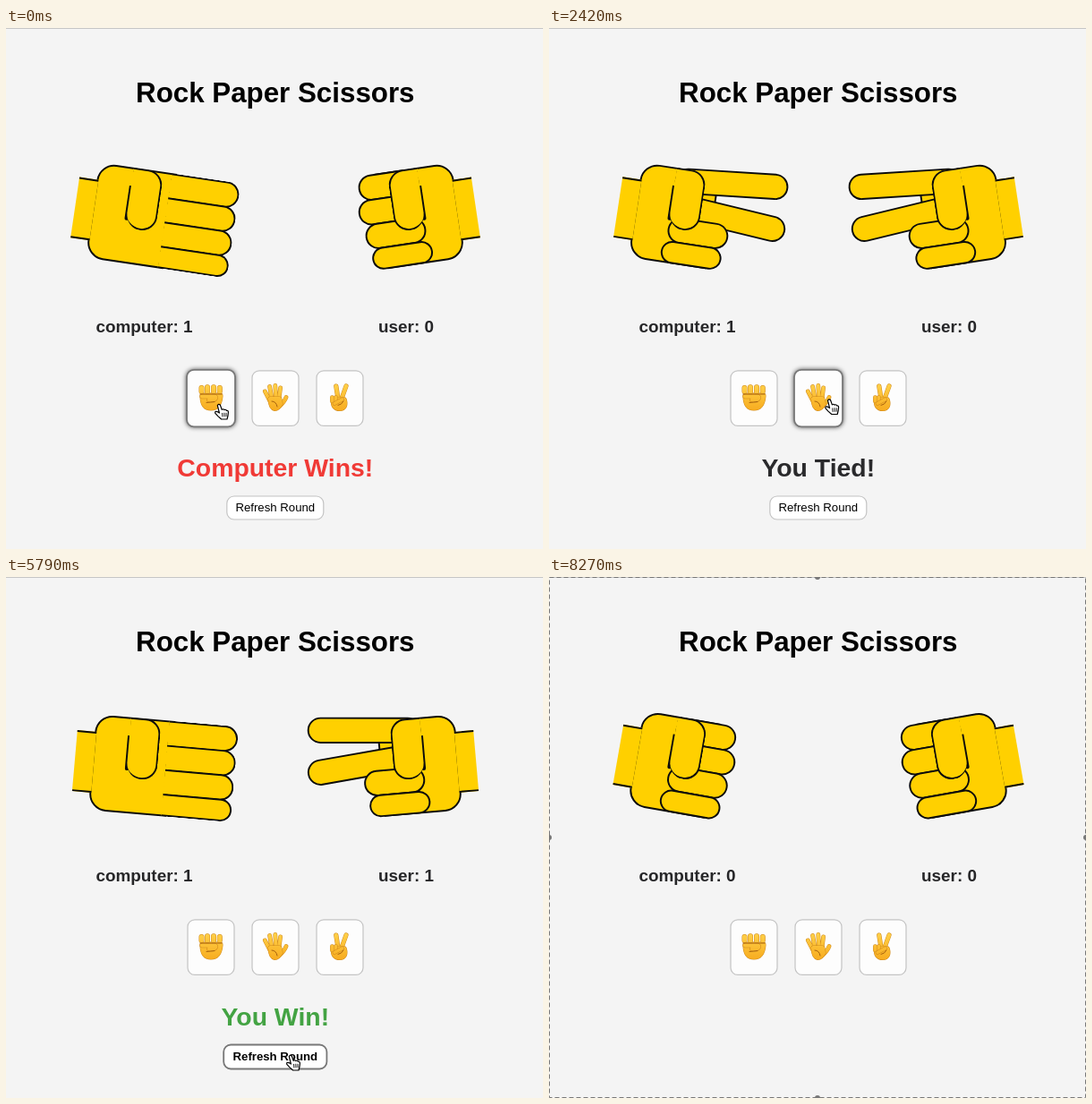
Write an HTML page that moves like this. It is 600 px wide and 582 px high and loops after 8300 ms.

```html
<!DOCTYPE html>
<html lang="en">
<head>
<meta charset="utf-8">
<title>Rock Paper Scissors</title>
<style>
html, body { margin: 0; width: 100%; height: 100%; overflow: hidden; background: #f4f4f4; }
svg { position: absolute; left: 0; top: 0; }
text { font-family: "Liberation Sans", Arial, sans-serif; font-weight: bold; text-anchor: middle; fill: #262628; }
.hand { position: absolute; top: 106.5px; width: 200px; height: 200px; }
.hand div { position: absolute; box-sizing: border-box; border: 2px solid #0b0b0b; background: #ffd000; }
.hand .fist { left: 40px; top: 50px; width: 90px; height: 110px; border-radius: 20px 0 0 20px; }
.hand .finger { height: 30px; transform-origin: 0 50%; }
.hand .thumb { left: 80px; top: 50px; width: 35px; height: 70px; border-left: 0 solid;
  border-radius: 0 20px 20px 20px; box-shadow: -17px 6px 0 -15px #0b0b0b; }
.hand .arm { left: 20px; top: 70px; width: 22px; height: 70px; border-width: 2px 0; }
.emoji { stroke-linecap: round; stroke-linejoin: round; fill: none; }
</style>
</head>
<body>
<svg width="600" height="582">
  <defs>
    <linearGradient id="skin" gradientUnits="userSpaceOnUse" x1="0" y1="397" x2="0" y2="428">
      <stop offset="0" stop-color="#ffd24a"/><stop offset="1" stop-color="#f7ab1f"/>
    </linearGradient>
  </defs>
  <path d="M0 .5H600" stroke="#c6c6c6"/>
  <text x="300.8" y="83" font-size="31.3" style="fill:#000">Rock Paper Scissors</text>
  <text id="compScore" x="154.5" y="340" font-size="18.9"></text>
  <text id="userScore" x="447" y="340" font-size="18.9"></text>
  <g id="buttons"></g>
  <g class="emoji" id="emoji"></g>
  <text id="result" x="300.8" y="500.5" font-size="28.4"></text>
  <g id="refresh">
    <rect fill="#fff"/>
    <text x="300.8" y="540" font-size="13.2" style="fill:#000">Refresh Round</text>
  </g>
  <g id="frame" fill="#777">
    <rect x=".5" y=".5" width="599" height="581" fill="none" stroke="#777" stroke-dasharray="5 3"/>
    <circle cx="300" r="3"/><circle cy="291" r="3"/>
    <circle cx="600" cy="291" r="3"/><circle cx="300" cy="582" r="3"/>
  </g>
  <g id="cursor">
    <g id="pointer" stroke="#000" stroke-linejoin="round" stroke-linecap="round">
      <path fill="#fff" stroke-width="1.2" d="M-1.7 1.6Q-.4-.7 1.3 1L3.2 6.4Q4.6 5 5.9 6.6Q7.4 5.6 8.4 7.4Q10.4 7 10.4 9.4L10 13L9 17H2.6L-1.2 13.6L-4.2 10.4Q-4.9 7.6-2 8.6L.4 10Z"/>
      <path fill="none" stroke-width=".9" d="M3.6 10.4l.3 3.6M5.8 10.2l.2 3.7M8 10.2v3.6"/>
    </g>
    <path id="arrow" fill="#000" stroke="#fff" d="M0 0V13.5L3 10.8L5.2 15.8L7.5 14.8L5.3 10H9.4Z"/>
  </g>
</svg>
<script>
const LOOP = 8300;
const $ = id => document.getElementById(id);
const mix = (a, b, p) => a + (b - a) * p;
const clamp = x => Math.min(1, Math.max(0, x));
const smooth = x => x * x * (3 - 2 * x);

// CSS "ease" curve, solved by bisection
function ease(x) {
  const bez = (a, b, s) => 3 * a * s * (1 - s) ** 2 + 3 * b * s * s * (1 - s) + s ** 3;
  let lo = 0, hi = 1;
  for (let i = 0; i < 24; i++) {
    const mid = (lo + hi) / 2;
    if (bez(.25, .25, mid) < x) lo = mid; else hi = mid;
  }
  return bez(.1, 1, lo);
}

// Finger poses: [left, width, rotation, left border, left radius]
const lefts = [80, 84, 80, 76];
const rock = lefts.map(l => [l, 70, 0, 2, 20]);
const paper = lefts.map(() => [124, 80, 0, 0, 0]);
const scissors = rock.map((f, i) => i < 2 ? [f[0], 130, i ? 5 : -5, 2, 20] : f);

const RED = "#f03a36", GREEN = "#43a343", DARK = "#2a2a2c";
// [time, computer pose, user pose, computer score, user score, result, colour]
const rounds = [
  [0, paper, rock, 1, 0, "Computer Wins!", RED],
  [800, paper, paper, 1, 0, "You Tied!", DARK],
  [1900, scissors, scissors, 1, 0, "You Tied!", DARK],
  [2950, paper, paper, 1, 0, "You Tied!", DARK],
  [4300, paper, scissors, 1, 1, "You Win!", GREEN],
  [6080, rock, rock, 0, 0, "", DARK]
];

// Cursor stops: [time, x, y]
const stops = [
  [0, 238, 420], [120, 240, 420], [560, 299, 419], [900, 301, 419], [1380, 352, 417],
  [1560, 353, 417], [1800, 370, 417], [2020, 369, 417], [2340, 314, 414.5], [2450, 313, 414.5],
  [2750, 301, 416], [3500, 302, 416], [3960, 362, 416], [4450, 368, 419],
  [5550, 318, 534], [6150, 318, 534], [6650, 560, 540]
];

const buttonXs = [229, 301, 373];
const boxes = buttonXs.map(x => [x, 413.6, 26, 30.8]).concat([[300.8, 536, 54, 13]]);

function cursorAt(t) {
  let i = 0;
  while (i < stops.length - 2 && t >= stops[i + 1][0]) i++;
  const a = stops[i], b = stops[i + 1];
  const p = smooth(clamp((t - a[0]) / (b[0] - a[0])));
  return [mix(a[1], b[1], p), mix(a[2], b[2], p)];
}

function over(box, t) {
  const [x, y] = cursorAt(Math.max(0, t));
  return Math.abs(x - box[0]) < box[2] && Math.abs(y - box[1]) < box[3];
}

// Hover strength trails the cursor a little
const hover = (box, t) => [60, 80, 100, 120, 140].filter(d => over(box, t - d)).length / 5;

function styleBox(rect, [x, y, w, h], growX, growY, a) {
  const g = mix(196, 120, a);
  const attrs = {
    x: x - w - growX, y: y - h - growY, width: 2 * (w + growX), height: 2 * (h + growY), rx: 8,
    stroke: `rgb(${g},${g},${g})`, "stroke-width": mix(1.2, 1.8, a)
  };
  for (const k in attrs) rect.setAttribute(k, attrs[k]);
}

function makeHand(cx, flip) {
  const hand = document.createElement("div");
  hand.className = "hand";
  hand.style.left = cx - 100 + "px";
  hand.innerHTML = '<div class="fist"></div>' + '<div class="finger"></div>'.repeat(4) +
    '<div class="thumb"></div><div class="arm"></div>';
  document.body.append(hand);
  const fingers = [...hand.querySelectorAll(".finger")];
  fingers.forEach((f, i) => f.style.top = 50 + 28 * i + "px");
  fingers[3].style.height = "26px";
  return (angle, from, to, p) => {
    hand.style.transform = `scale(${flip * .975}, .975) rotate(${angle}deg)`;
    fingers.forEach((f, i) => {
      const [l, w, r, b, rad] = to[i].map((v, k) => mix(from[i][k], v, p));
      f.style.left = l + "px";
      f.style.width = w + "px";
      f.style.transform = `rotate(${r}deg)`;
      f.style.borderLeftWidth = b + "px";
      f.style.borderRadius = `${rad}px 20px 20px ${rad}px`;
    });
  };
}

// Small emoji: limbs are thick strokes with a darker rim
function limbs(width, ...paths) {
  const d = paths.join("");
  return `<path d="${d}" stroke="#d08a1c" stroke-width="${width + 1}"/>` +
    `<path d="${d}" stroke="url(#skin)" stroke-width="${width}"/>`;
}
const body = d => `<path d="${d}" fill="url(#skin)"/>`;
const crease = d => `<path d="${d}" stroke="#a8620f" stroke-width="1"/>`;

$("emoji").innerHTML =
  // fist
  limbs(6, "M220 411Q220 424 229 424Q238 424 239 411Z") + body("M219 409H240L238 422Q229 428 221 422Z") +
  limbs(5, "M218.5 402V406", "M225 401.3V406") + limbs(5, "M232 401.3V406", "M238.8 402V406") +
  limbs(4.4, "M219 411.5H233Q236 413 232 415.5H227") + crease("M217 409H241M224 418.5Q229 418 233 417.5") +
  // open palm
  limbs(3.8, "M295 417L289.4 406", "M297 414L294.6 400.5", "M301.5 413L300.8 399.5", "M305 414L306.6 402", "M305 423Q311 418 313 412.5") +
  limbs(5, "M295.5 414.5H305.5L306.5 420Q304 425 300.5 425Q296 424 295.5 414.5") +
  body("M294 413H307L307 421Q304 426 300 426Q295 424 294 413Z") + crease("M297 417Q302 417 303 423") +
  // victory
  limbs(4.2, "M371 414L368.8 400", "M375 414L380 400") +
  limbs(7, "M367 416H377Q379 424 373 424Q366 424 367 416Z") + body("M365 415H379L378 423Q372 427 367 423Z") +
  limbs(3.6, "M364.4 412.5V417", "M368.5 412.5V417") + limbs(3.6, "M367 419.5L375.5 415") + crease("M371 421.5Q375 421 377 417");

$("buttons").innerHTML = '<rect fill="#fdfdfd"/>'.repeat(3);
const buttonRects = [...$("buttons").children];
const [refreshRect, refreshText] = $("refresh").children;
const computerHand = makeHand(155, 1), userHand = makeHand(446.7, -1);

function draw(t) {
  let i = rounds.length - 1;
  while (t < rounds[i][0]) i--;
  const now = rounds[i], before = rounds[Math.max(0, i - 1)];
  const change = i ? ease(clamp((t - now[0]) / 100)) : 1;

  // Two-second shake between 10 and -10 degrees
  const phase = (t + 1660) % 2000;
  const swing = 10 - 20 * ease(phase % 1000 / 1000);
  const angle = phase < 1000 ? swing : -swing;
  computerHand(angle, before[1], now[1], change);
  userHand(angle, before[2], now[2], change);

  $("compScore").textContent = "computer: " + now[3];
  $("userScore").textContent = "user: " + now[4];
  $("result").textContent = now[5];
  $("result").style.fill = now[6];

  buttonRects.forEach((rect, k) => {
    const a = hover(boxes[k], t);
    styleBox(rect, boxes[k], a, a, a);
    rect.style.filter = a ? `drop-shadow(0 0 ${2.5 * a}px #555)` : "none";
  });

  $("refresh").style.display = now[5] ? "" : "none";
  const a = hover(boxes[3], t);
  styleBox(refreshRect, boxes[3], 3.6 * a, .5 * a, a);
  refreshText.style.fontWeight = a > .5 ? "bold" : "normal";

  const [x, y] = cursorAt(t);
  const pointing = boxes.some((b, k) => (k < 3 || now[5]) && over(b, t));
  $("cursor").style.display = t < 6780 ? "" : "none";
  $("cursor").setAttribute("transform", `translate(${x} ${y})`);
  $("pointer").style.display = pointing ? "" : "none";
  $("arrow").style.display = pointing ? "none" : "";
  $("frame").style.display = t >= 7100 ? "" : "none";
}

const start = performance.now();
function tick() {
  draw((performance.now() - start) % LOOP);
  requestAnimationFrame(tick);
}
tick();
</script>
</body>
</html>
```
